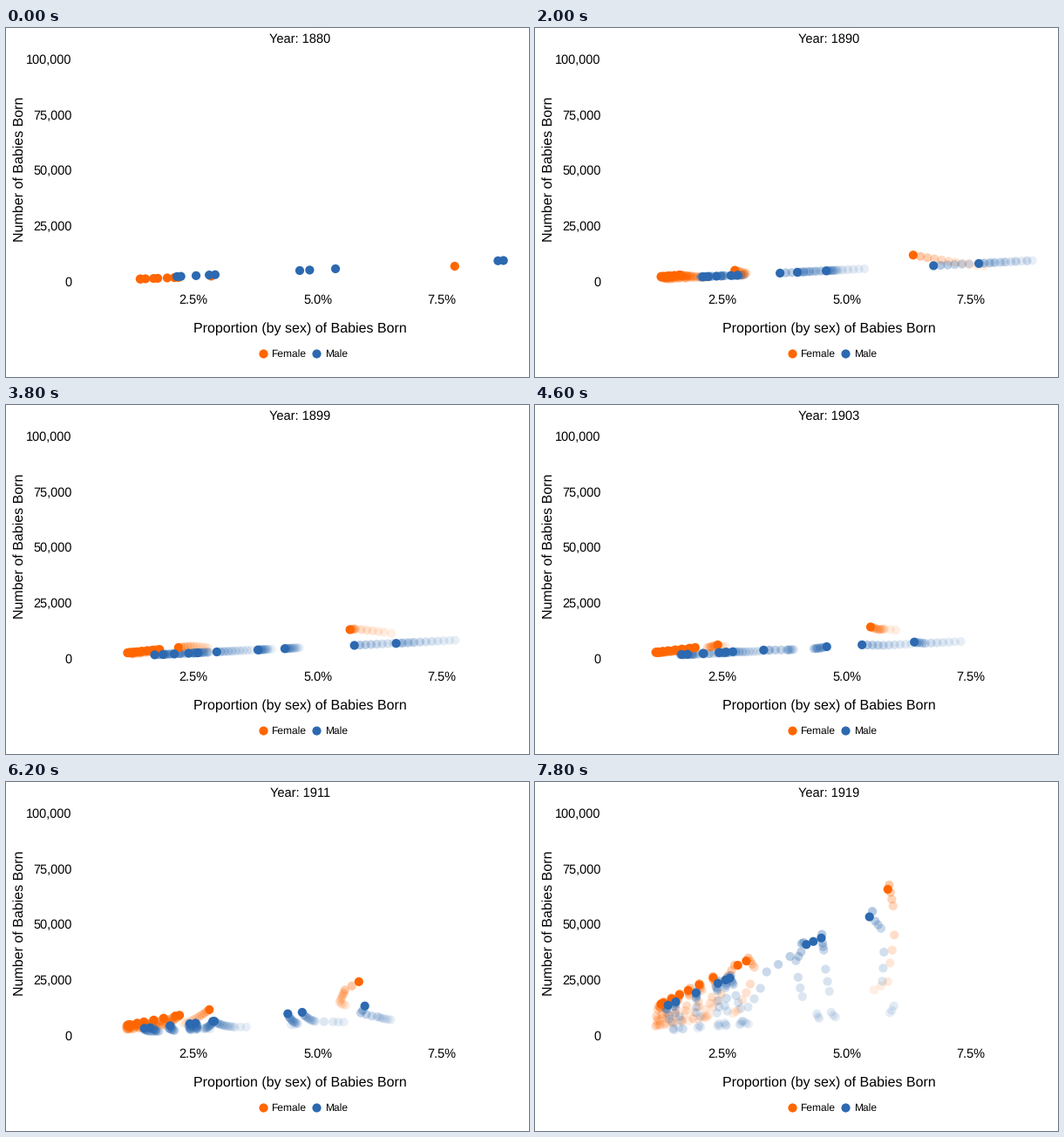
Write a matplotlib script that moves like this. It is 600 by 400 pixels and loops after 8 s.

```python
import numpy as np
import matplotlib.pyplot as plt
from matplotlib.animation import FuncAnimation
from matplotlib.colors import to_rgb

W, H, DPI = 600, 400, 100
START, YEARS, WAKE = 1880, 40, 10
STEP_MS = 200
ORANGE, BLUE = "#ff6600", "#2c69b0"
DOT = 10.2

plt.rcParams["font.family"] = "Liberation Sans"
plt.rcParams["text.hinting"] = "none"

rng = np.random.default_rng(4)
t = np.arange(YEARS)


def path(keys):
    """Value for every year, from a few {year: value} points."""
    return np.interp(t, list(keys), list(keys.values()))


def growth(keys):
    return np.exp(path({k: np.log(v) for k, v in keys.items()}))


def crowd(count, top, low, curve):
    """Ranked shares that fall from the top path to the low path."""
    top, low = path(top), path(low)
    ranks = np.linspace(0, 1, count)
    return [low + (top - low) * curve(u) + rng.normal(0, 0.02, YEARS)
            for u in ranks]


def to_x(share):
    return 215 + (share - 2.5) * 57


def to_y(thousands):
    return 291 - thousands * 2.55


def place(shares, births):
    """Pixel positions, shaped (year, name, xy)."""
    share = np.array(shares).T
    named = share / 100 * births[:, None]
    return np.stack([to_x(share), to_y(named)], axis=2)


# Births per year in thousands; shares in percent
girl_births = growth({0: 91, 10: 190, 15: 234, 19: 233, 23: 262, 31: 418,
                      32: 558, 34: 761, 35: 984, 38: 1158, 39: 1130})
girls = [
    path({0: 7.76, 7: 6.77, 10: 6.34, 15: 5.76, 19: 5.65, 24: 5.44, 29: 5.55,
          31: 5.83, 34: 5.96, 39: 5.83}),
    path({0: 2.86, 5: 2.98, 10: 2.75, 19: 2.2, 31: 2.82, 35: 3.14, 39: 2.98}),
    path({0: 2.2, 10: 1.64, 19: 1.82, 31: 2.22, 35: 2.56, 39: 2.81}),
] + crowd(7, {0: 2.13, 10: 1.63, 19: 1.7, 31: 2.13, 35: 2.34, 39: 2.32},
          {0: 1.41, 10: 1.25, 19: 1.16, 35: 1.19, 39: 1.28},
          lambda u: (1 - u) ** 1.5)

boy_births = growth({0: 110, 19: 106, 23: 119, 27: 147, 30: 194, 31: 226,
                     32: 430, 34: 655, 35: 849, 37: 925, 38: 1014, 39: 980})
boys = [
    path({0: 8.74, 10: 7.66, 19: 6.58, 26: 6.2, 29: 5.87, 31: 5.95, 32: 5.72,
          34: 5.75, 39: 5.46}),
    path({0: 8.63, 5: 7.46, 10: 6.75, 19: 5.74, 23: 5.31, 25: 4.95, 31: 4.69,
          35: 4.54, 39: 4.49}),
    path({0: 5.36, 5: 4.8, 10: 4.59, 19: 4.34, 23: 4.6, 31: 4.4, 32: 4.11,
          35: 3.98, 39: 4.19}),
    path({0: 4.84, 10: 3.66, 19: 2.97, 23: 2.71, 31: 2.89, 35: 3.39, 39: 4.33}),
    path({0: 4.64, 10: 4.01, 19: 3.8, 23: 3.33, 31: 2.92, 35: 2.72, 39: 2.65}),
] + crowd(5, {0: 2.93, 10: 2.79, 19: 2.55, 39: 2.59},
          {0: 2.19, 10: 2.1, 19: 1.74, 31: 1.5, 35: 1.36, 39: 1.38},
          lambda u: (1 + np.cos(np.pi * u)) / 2)

points = np.concatenate([place(girls, girl_births), place(boys, boy_births)],
                        axis=1)
colors = np.array([to_rgb(ORANGE)] * len(girls) + [to_rgb(BLUE)] * len(boys))

fig = plt.figure(figsize=(W / DPI, H / DPI), dpi=DPI, facecolor="white")
ax = fig.add_axes([0, 0, 1, 1])
ax.set_xlim(0, W)
ax.set_ylim(H, 0)
ax.axis("off")


def label(x, y, text, px, ha="center", **kw):
    return ax.text(x, y, text, fontsize=px * 72 / DPI, ha=ha, va="baseline",
                   color="black", **kw)


def dots(x, y, color):
    return ax.scatter(x, y, s=(DOT * 72 / DPI) ** 2, c=color, linewidths=0,
                      snap=False)


title = label(337.3, 17.2, "", 14.67)
for n in range(0, 101, 25):
    label(75.5, to_y(n) + 5, f"{n * 1000:,}", 14.5, ha="right")
for share in (2.5, 5.0, 7.5):
    label(to_x(share), 316, f"{share}%", 14.5)
label(337.3, 349, "Proportion (by sex) of Babies Born", 16)
label(20, 161.5, "Number of Babies Born", 16, rotation=90,
      rotation_mode="anchor")

for x, name, color in ((294.5, "Female", ORANGE), (356, "Male", BLUE)):
    dots([x], [372.5], color)
    label(x + 10, 377, name, 12, ha="left")

cloud = dots([], [], BLUE)


def fade(age):
    rest = np.clip((WAKE - age) / (WAKE - 1), 0, 1)
    return np.where(age == 0, 1.0, 0.11 + 0.25 * rest ** 1.5)


def draw(i):
    years = np.arange(max(0, i - WAKE), i + 1)
    alpha = np.repeat(fade(i - years), len(colors))
    rgb = np.tile(colors, (len(years), 1))
    cloud.set_offsets(points[years].reshape(-1, 2))
    cloud.set_facecolors(np.column_stack([rgb, alpha]))
    title.set_text(f"Year: {START + i}")
    return cloud, title


anim = FuncAnimation(fig, draw, frames=YEARS, interval=STEP_MS, repeat=True,
                     repeat_delay=0, blit=False)
plt.show()
```
